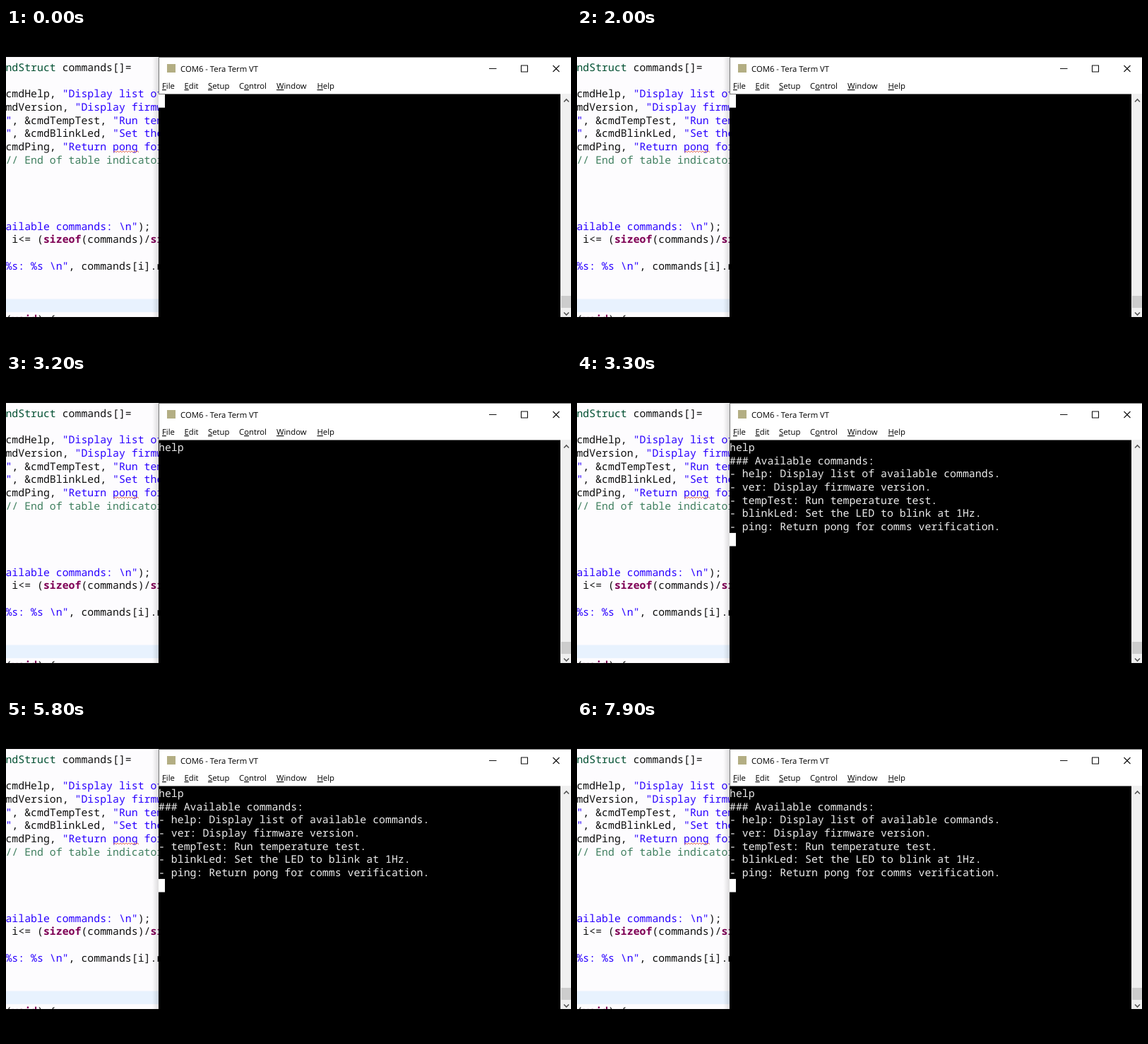
Recreate the animation shown at these times as an HTML page. Size 800 by 450 pixels, loop 8000 ms.

```html
<!DOCTYPE html>
<html lang="en">
<head>
<meta charset="utf-8">
<title>Serial terminal help command</title>
<style>
  html, body { margin: 0; width: 100%; height: 100%; overflow: hidden; background: #000; }
  svg { display: block; width: 800px; height: 450px; }
  text { white-space: pre; text-rendering: geometricPrecision; }
  .mono { font: 14.87px "Noto Sans Mono", "DejaVu Sans Mono", monospace; }
  .ui { font: 11.3px "Open Sans", "Noto Sans", sans-serif; fill: #000; }
  .ui .key { text-decoration: underline; }
  .code { fill: #101010; }
  .type { fill: #005032; }
  .str { fill: #2a00ff; }
  .kw { fill: #7f0055; font-weight: bold; }
  .note { fill: #3f7f5f; }
  #term { fill: #ececec; }
</style>
</head>
<body>
<svg viewBox="0 0 800 450">
  <defs>
    <clipPath id="view"><rect y="41" width="800" height="368"/></clipPath>
    <linearGradient id="shade">
      <stop offset="0" stop-color="#000" stop-opacity="0"/>
      <stop offset="1" stop-color="#000" stop-opacity=".13"/>
    </linearGradient>
  </defs>
  <rect width="800" height="450"/>
  <g clip-path="url(#view)">
    <rect y="41" width="800" height="368" fill="#fdfcfe"/>
    <rect y="383.5" width="216" height="18.7" fill="#e8f2fe"/>
    <g id="code" class="mono code"></g>
    <path id="wave" fill="none" stroke="#e0705c"/>
    <rect x="207" y="42" width="9" height="367" fill="url(#shade)"/>

    <rect x="216" y="41" width="584" height="53" fill="#777"/>
    <rect x="217" y="42" width="583" height="51" fill="#fff"/>
    <rect x="228" y="51" width="12" height="12" fill="#b3ae83"/>
    <text class="ui" x="247" y="62">COM6 - Tera Term VT</text>
    <g id="menu" class="ui"></g>
    <path d="M684 57.5h10.5M729.5 53h9v9h-9zM774.5 53l9 9m0-9l-9 9" fill="none" stroke="#111" stroke-width="1.1"/>

    <rect x="216" y="94" width="569" height="315"/>
    <rect x="785" y="93" width="15" height="316" fill="#f0f0f0"/>
    <rect x="786" y="379" width="14" height="17" fill="#cdcdcd"/>
    <path d="M790 104.5l3.5-3.5 3.5 3.5M790 402.5l3.5 3.5 3.5-3.5" fill="none" stroke="#555" stroke-width="1.6"/>
    <g id="term" class="mono"></g>
    <rect id="caret" width="9" height="18.7" fill="#fff"/>
  </g>
</svg>
<script>
const LOOP = 8000, BLINK = 530, CELL = 8.92, ROW = 18.75, TERM_ROW = 18.7, LEFT = 216;
const byId = id => document.getElementById(id);

function add(parent, tag, attrs, content = '') {
  const node = document.createElementNS('http://www.w3.org/2000/svg', tag);
  for (const name in attrs) node.setAttribute(name, attrs[name]);
  node.textContent = content;
  parent.append(node);
  return node;
}

// Each line: row number, then alternating class and text
const source = [
  [0, 'type', 'ndStruct', 'code', ' commands[]='],
  [2, 'code', 'cmdHelp, ', 'str', '"Display list of'],
  [3, 'code', 'mdVersion, ', 'str', '"Display firmware'],
  [4, 'str', '"', 'code', ', &cmdTempTest, ', 'str', '"Run temp'],
  [5, 'str', '"', 'code', ', &cmdBlinkLed, ', 'str', '"Set the'],
  [6, 'code', 'cmdPing, ', 'str', '"Return pong for'],
  [7, 'note', '// End of table indicator'],
  [12, 'str', 'ailable commands: \\n"', 'code', ');'],
  [13, 'code', ' i<= (', 'kw', 'sizeof', 'code', '(commands)/', 'kw', 'sizeof'],
  [15, 'str', '%s: %s \\n"', 'code', ', commands[i].name'],
  [19, 'code', '(', 'kw', 'void', 'code', ') {']
];
for (const [row, ...parts] of source) {
  const line = add(byId('code'), 'text', { x: -0.6, y: 60.5 + ROW * row });
  for (let i = 0; i < parts.length; i += 2) add(line, 'tspan', { class: parts[i] }, parts[i + 1]);
}
byId('wave').setAttribute('d', 'M152 176' + 'l2-2 2 2'.repeat(9));

// An underscore precedes the access key
const menu = [[221, '_File'], [252.5, '_Edit'], [286, '_Setup'], [330, 'C_ontrol'], [383, '_Window'], [440.5, '_Help']];
for (const [x, label] of menu) {
  const [before, after] = label.split('_');
  const item = add(byId('menu'), 'text', { x, y: 86 });
  add(item, 'tspan', {}, before);
  add(item, 'tspan', { class: 'key' }, after[0]);
  add(item, 'tspan', {}, after.slice(1));
}

const output = [
  'help',
  '### Available commands:',
  '- help: Display list of available commands.',
  '- ver: Display firmware version.',
  '- tempTest: Run temperature test.',
  '- blinkLed: Set the LED to blink at 1Hz.',
  '- ping: Return pong for comms verification.'
];
const lines = output.map((text, row) =>
  add(byId('term'), 'text', { x: LEFT, y: 108.8 + TERM_ROW * row }, text));

const keyTimes = [2250, 2380, 2520, 2660], enterTime = 3250;

function draw(t) {
  const typed = keyTimes.filter(k => t >= k).length;
  const done = t >= enterTime;
  lines[0].textContent = output[0].slice(0, typed);
  lines.slice(1).forEach(line => line.setAttribute('visibility', done ? 'visible' : 'hidden'));

  // The blink restarts whenever the caret moves
  const since = done ? enterTime : typed ? keyTimes[typed - 1] : -300;
  const caret = byId('caret');
  caret.setAttribute('x', LEFT + (done ? 0 : typed * CELL));
  caret.setAttribute('y', 94 + (done ? output.length * TERM_ROW : 0));
  caret.setAttribute('visibility', (t - since) % (2 * BLINK) < BLINK ? 'visible' : 'hidden');
}

const start = performance.now();
function tick() {
  draw((performance.now() - start) % LOOP);
  requestAnimationFrame(tick);
}
tick();
</script>
</body>
</html>
```
